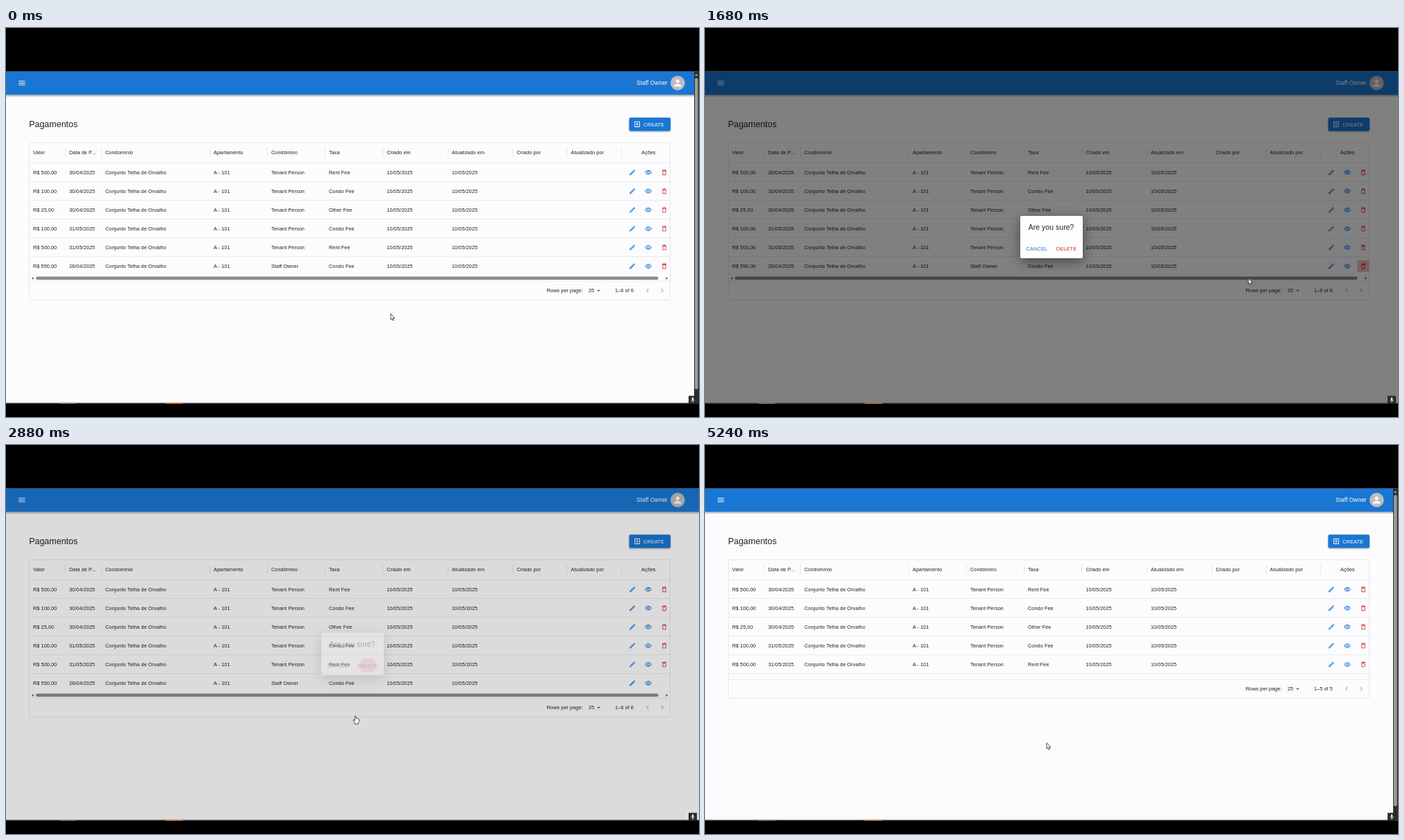
An HTML page that plays this animation: 998x561 px, repeating every 5.32 s.

```html
<!DOCTYPE html>
<html lang="pt">
<meta charset="utf-8">
<title>Pagamentos</title>
<style>
  html, body { margin: 0; width: 100%; height: 100%; overflow: hidden; background: #000 }
  svg { display: block; width: 998px; height: 561px }
  text { font: 7.28px "Liberation Sans", Arial, sans-serif; letter-spacing: .01071em; fill: #212121; white-space: pre }
  .button { letter-spacing: .02857em }
  .paper { filter: drop-shadow(0 .8px .7px rgba(0,0,0,.35)) }
  .raised { filter: drop-shadow(0 1px 1px rgba(0,0,0,.35)) }
  .dialog { filter: drop-shadow(0 5px 9px rgba(0,0,0,.45)) }
</style>
<svg id="stage" viewBox="0 0 998 561"></svg>
<script>
const LOOP = 5320, ROW = 27.04, TOP = 194.7;
const BLUE = '#1976d2', RED = '#d32f2f', PAGE = '#fcfcfe', LINE = '#e2e2e4';

const ICONS = {
  menu: 'M3 18h18v-2H3zm0-5h18v-2H3zm0-7v2h18V6z',
  person: 'M12 12a4 4 0 1 0 0-8 4 4 0 0 0 0 8zm0 2c-2.67 0-8 1.34-8 4v2h16v-2c0-2.66-5.33-4-8-4z',
  add: 'M19 3H5a2 2 0 0 0-2 2v14a2 2 0 0 0 2 2h14a2 2 0 0 0 2-2V5a2 2 0 0 0-2-2zm0 16H5V5h14zm-8-2h2v-4h4v-2h-4V7h-2v4H7v2h4z',
  edit: 'm14.06 9.02.92.92L5.92 19H5v-.92zM17.66 3c-.25 0-.51.1-.7.29l-1.83 1.83 3.75 3.75 1.83-1.83a1 1 0 0 0 0-1.41l-2.34-2.34a1 1 0 0 0-.71-.29zm-3.6 3.19L3 17.25V21h3.75L17.81 9.94z',
  view: 'M12 6c3.79 0 7.17 2.13 8.82 5.5C19.17 14.87 15.79 17 12 17s-7.17-2.13-8.82-5.5C4.83 8.13 8.21 6 12 6m0-2C7 4 2.73 7.11 1 11.5 2.73 15.89 7 19 12 19s9.27-3.11 11-7.5C21.27 7.11 17 4 12 4zm0 5a2.5 2.5 0 0 1 0 5 2.5 2.5 0 0 1 0-5m0-2a4.5 4.5 0 1 0 0 9 4.5 4.5 0 0 0 0-9z',
  trash: 'M6 19a2 2 0 0 0 2 2h8a2 2 0 0 0 2-2V7H6zM8 9h8v10H8zm7.5-5-1-1h-5l-1 1H5v2h14V4z',
  drop: 'm7 10 5 5 5-5z',
  left: 'M15.41 7.41 14 6l-6 6 6 6 1.41-1.41L10.83 12z',
  right: 'M10 6 8.59 7.41 13.17 12l-4.58 4.59L10 18l6-6z',
  mic: 'M12 14a3 3 0 0 0 3-3V5a3 3 0 0 0-6 0v6a3 3 0 0 0 3 3zm5-3a5 5 0 0 1-10 0H5a7 7 0 0 0 6 6.9V21h2v-3.1A7 7 0 0 0 19 11z'
};

const icon = (name, x, y, fill, scale = .433, more = '') =>
  `<path d="${ICONS[name]}" fill="${fill}" fill-rule="evenodd" transform="translate(${x} ${y}) scale(${scale}) translate(-12 -12)" ${more}/>`;
const rect = (x, y, w, h, fill, more = '') =>
  `<rect x="${x}" y="${y}" width="${w}" height="${h}" fill="${fill}" ${more}/>`;
const text = (x, y, value, more = '') => `<text x="${x}" y="${y}" ${more}>${value}</text>`;
const group = (id, body, more = '') => `<g id="${id}" ${more}>${body}</g>`;

const columns = [
  [39, 'Valor'], [91, 'Data de P...'], [143, 'Condomínio'], [299, 'Apartamento'], [382, 'Condômino'],
  [465, 'Taxa'], [548.5, 'Criado em'], [642, 'Atualizado em'], [735.5, 'Criado por'], [813.5, 'Atualizado por']
];
const payments = [
  ['500', '30/04', 'Rent'], ['100', '30/04', 'Condo'], ['25', '30/04', 'Other'],
  ['100', '31/05', 'Condo'], ['500', '31/05', 'Rent'], ['550', '28/04', 'Condo']
];

function paymentRow([value, day, fee], i) {
  const y = TOP + ROW * i, mid = y + 13.6, last = i === 5;
  const cells = [`R$ ${value},00`, `${day}/2025`, 'Conjunto Telha de Orvalho', 'A - 101',
    last ? 'Staff Owner' : 'Tenant Person', `${fee} Fee`, '10/05/2025', '10/05/2025'];
  return group(`row${i}`,
    (last ? '' : rect(34, y + ROW - .5, 922.5, .7, LINE)) +
    cells.map((c, k) => text(columns[k][0], mid + 2.5, c)).join('') +
    icon('edit', 902, mid, BLUE) + icon('view', 925, mid + .2, BLUE) +
    icon('trash', 948, mid, RED, .433, `id="trash${i}"`));
}

const header = columns.map(([x, label]) => text(x, 182, label)).join('') + text(915, 182, 'Ações') +
  columns.map((_, i) => rect((columns[i + 1]?.[0] ?? 892) - 6, 173, .8, 13, LINE)).join('');

const footer = rect(34, 364.6, 922.5, .7, LINE) + text(778.7, 381, 'Rows per page:') +
  text(839, 381, '25') + icon('drop', 853.5, 378.7, '#666', .5) +
  '<text id="range" x="877" y="381"></text>' +
  icon('left', 924, 378.5, '#aaa', .5) + icon('right', 945, 378.5, '#aaa', .5);

const tableScroll = rect(43, 358.6, 896.5, 4.4, '#8b8b88', 'rx="2.2"') +
  '<path d="M39.5 359v4l-2.6-2zM950.5 359v4l2.6-2z" fill="#555"/>';

const dialog = rect(454, 271, 90, 61, '#fff', 'rx="2" class="dialog"') +
  text(465.7, 291.3, 'Are you sure?', 'style="font-size:10.4px;letter-spacing:.0075em"') +
  rect(501.5, 308.5, 38, 19, RED, 'rx="2" id="deleteHover"') +
  '<circle id="deleteRipple" cx="521" cy="318" fill="#d32f2f" opacity=".3" clip-path="url(#deleteClip)"/>' +
  text(462.5, 320.6, 'CANCEL', `class="button" style="fill:${BLUE}"`) +
  text(505.7, 320.6, 'DELETE', `class="button" style="fill:${RED}"`);

const outline = 'fill="#fff" stroke="#222" stroke-width=".8" stroke-linejoin="round"';
const cursors = `<path id="arrow" d="M0 0V8.6L1.9 6.9 3.2 9.9 4.6 9.3 3.3 6.4H5.9z" ${outline}/>
  <path id="hand" d="M-.9 .8Q0-.6 .9 .8V4L2.4 4.2 3.8 4.6 5 5.3V8.2L4.1 10.5V11.8H-1.2V10.6L-3.4 7.2Q-3.5 5.7-2.2 6.2L-.9 7.4z" ${outline}/>`;

const stage = document.getElementById('stage');
stage.innerHTML = `<defs>
    <clipPath id="screen">${rect(0, 62.5, 998, 479.5, '#000')}</clipPath>
    <clipPath id="deleteClip">${rect(501.5, 308.5, 38, 19, '#000', 'rx="2"')}</clipPath>
    <linearGradient id="shade" x2="0" y2="1"><stop stop-opacity=".36"/><stop offset="1" stop-opacity="0"/></linearGradient>
  </defs>` +
  rect(0, 0, 998, 561, '#000') +
  group('screenBody',
    rect(0, 62.5, 998, 479, PAGE) +
    rect(0, 96, 998, 4, 'url(#shade)') + rect(0, 62.5, 998, 33.7, BLUE) +
    icon('menu', 22.8, 79.4, '#fff', .52) +
    text(908, 82.3, 'Staff Owner', 'style="font-size:8.32px;fill:#fff"') +
    '<circle cx="967.3" cy="79.4" r="10.4" fill="#bdbdbd"/>' + icon('person', 967.3, 79.4, '#fff', .65) +
    rect(25, 122, 940, 283, PAGE, 'rx="2" class="paper" id="paper"') +
    text(33.2, 143, 'Pagamentos', 'style="font-size:12.48px;letter-spacing:0"') +
    rect(897.5, 129.3, 59.5, 19.2, BLUE, 'rx="2" class="raised"') + icon('add', 909, 138.9, '#fff', .45) +
    text(918, 141.5, 'CREATE', 'class="button" style="fill:#fff"') +
    rect(33.5, 165.5, 923, 227, 'none', `rx="2" stroke="${LINE}" stroke-width=".8" id="frame"`) +
    rect(34, TOP - .9, 922.5, .7, LINE) + header +
    rect(34, 0, 922.5, ROW, '#000', 'id="rowHover" opacity=".04"') +
    rect(939.3, 335, 17, 16.5, RED, 'rx="2" id="trashPress"') +
    payments.map(paymentRow).join('') +
    group('tableScroll', tableScroll) + group('footer', footer) +
    rect(886.5, 303, 70, 27, 'none', 'stroke="#8fa6d8" stroke-width=".9" id="cellFocus"') +
    group('pageScroll', rect(991, 62.5, 7, 479, '#2c2c2c') +
      rect(992, 72, 4.6, 449, '#9c9c9c', 'rx="2.3"') + '<path d="M992 69h4.4l-2.2-3z" fill="#aaa"/>') +
    rect(0, 62.5, 998, 479, '#000', 'id="scrim"') + group('dialog', dialog) +
    rect(0, 540.6, 998, 1.4, '#343844') + rect(77, 540.6, 24, 1.2, '#8a8a92') + rect(230, 540.6, 25, 1.3, '#e0803c') +
    rect(983, 530.5, 12, 11.5, '#2b2b2b') + icon('mic', 989, 536.5, '#fff', .38) +
    group('cursor', cursors), 'clip-path="url(#screen)"');

const el = Object.fromEntries([...stage.querySelectorAll('[id]')].map(e => [e.id, e]));
const set = (id, name, value) => el[id].setAttribute(name, value);
const show = (id, on) => set(id, 'display', on ? 'inline' : 'none');
const ramp = (t, from, to) => Math.max(0, Math.min(1, (t - from) / (to - from)));

const ease = {
  both: u => u * u * (3 - 2 * u),
  in: u => u ** 1.7,
  out: u => 1 - (1 - u) ** 2.2
};

// Material standard curve: cubic-bezier(.4, 0, .2, 1)
function standard(x) {
  let lo = 0, hi = 1, s;
  for (let i = 0; i < 20; i++) {
    s = (lo + hi) / 2;
    const at = 1.2 * s * (1 - s) ** 2 + .6 * s * s * (1 - s) + s ** 3;
    if (at < x) lo = s; else hi = s;
  }
  return 3 * s * s * (1 - s) + s ** 3;
}

// time, x, y, easing used to get there
const path = [
  [100, 554, 412], [940, 943.5, 340.5, 'both'], [1500, 943.5, 340.5, 'both'],
  [1680, 783.5, 361, 'in'], [2240, 521.5, 317.5, 'out'], [2740, 521.5, 317.5, 'both'],
  [2880, 503.5, 390, 'in'], [3160, 492, 429.5, 'out']
];
function pointer(t) {
  const next = path.findIndex(p => p[0] > t);
  if (next === 0) return path[0].slice(1);
  if (next < 0) return path.at(-1).slice(1);
  const [t0, x0, y0] = path[next - 1], [t1, x1, y1, kind] = path[next];
  const u = ease[kind](ramp(t, t0, t1));
  return [x0 + (x1 - x0) * u, y0 + (y1 - y0) * u];
}

function draw(t) {
  const [x, y] = pointer(t);
  const opened = t >= 1490 && t < 2985, removed = t >= 3120;
  const fade = standard(ramp(t, 1490, 1715)) * (1 - standard(ramp(t, 2790, 2985)));
  const overTrash = !opened && x > 939 && y > 335 && y < 352;
  const overDelete = x > 501 && x < 540 && y > 308 && y < 328;

  set('cursor', 'transform', `translate(${x} ${y})`);
  const isHand = overTrash || (opened && (overDelete || t > 2740));
  show('hand', isHand);
  show('arrow', !isHand);

  const row = Math.floor((y - TOP) / ROW);
  show('rowHover', !opened && !removed && row >= 0 && row < 6);
  set('rowHover', 'y', TOP + ROW * row);
  set('trashPress', 'opacity', Math.max(overTrash ? .05 : 0, .3 * ramp(t, 1400, 1490) * (1 - ramp(t, 1700, 1950))));

  show('scrim', opened);
  set('scrim', 'opacity', .5 * fade);
  show('dialog', opened);
  set('dialog', 'opacity', fade);
  set('deleteHover', 'opacity', overDelete || t > 2740 ? .05 : 0);
  set('deleteRipple', 'r', 12 * ramp(t, 2700, 2860));
  show('pageScroll', !opened);

  show('row5', !removed);
  show('trash5', t < 2800);
  show('tableScroll', !removed);
  show('cellFocus', removed && t < 4120);
  set('footer', 'transform', `translate(0 ${removed ? -ROW : 0})`);
  set('frame', 'height', removed ? 227 - ROW : 227);
  set('paper', 'height', removed ? 283 - ROW : 283);
  el.range.textContent = removed ? '1–5 of 5' : '1–6 of 6';
}

function tick() {
  draw(performance.now() % LOOP);
  requestAnimationFrame(tick);
}
tick();
</script>
</html>
```
